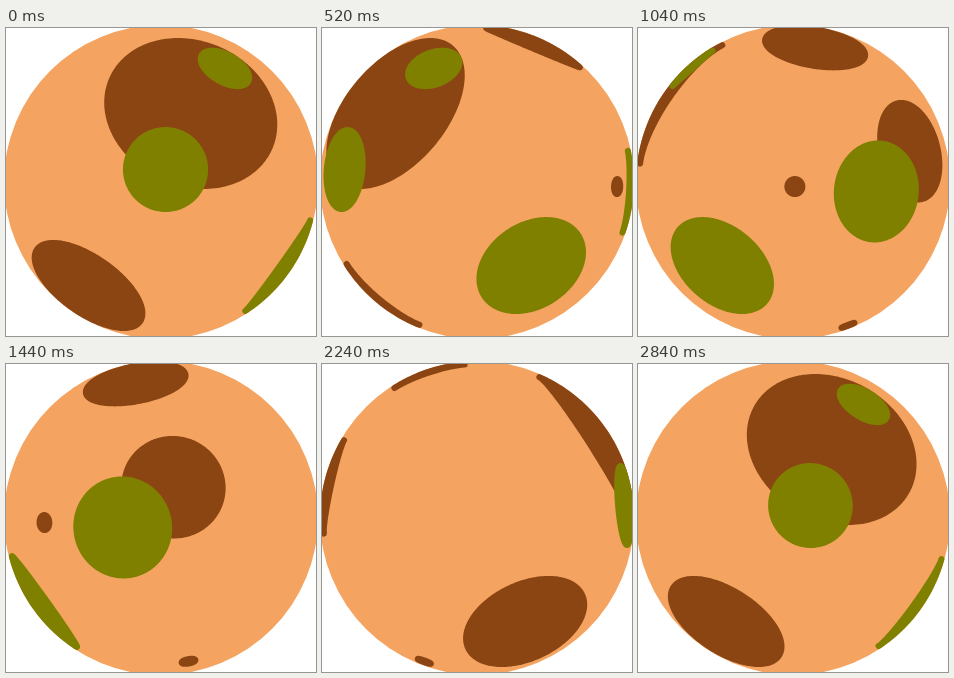
An HTML page with a canvas that plays this animation: 310 by 308 pixels, repeating every 2.88 s.

```html
<!DOCTYPE html>
<html lang="en">
<head>
<meta charset="utf-8">
<title>Spotted globe</title>
<style>
  html, body { margin: 0; width: 100%; height: 100%; overflow: hidden; background: #fff; }
  canvas { display: block; }
</style>
</head>
<body>
<canvas id="globe" width="310" height="308"></canvas>
<script>
const ctx = document.getElementById('globe').getContext('2d');
const CX = 155, CY = 154, RADIUS = 154, BRUSH = 3;
const LOOP = 2880, STEP = 40;
const RAD = Math.PI / 180, TAU = 2 * Math.PI;
const BROWN = '#8b4513', OLIVE = '#808000', SAND = '#f4a460';

// colour, latitude (down is positive), starting longitude, angular radius; degrees
const spots = [
  [BROWN, -32.4, 16, 33.9],
  [BROWN, 1.7, 130.7, 2.8],
  [BROWN, 47.4, -49.6, 24.1],
  [BROWN, -67.3, 153.2, 19.2],
  [BROWN, -12.2, 185, 18.7],
  [BROWN, 68.7, 209.5, 2.6],
  [OLIVE, -4.8, 1.75, 14.9],
  [OLIVE, -48.5, 39.5, 10],
  [OLIVE, 35.6, 92.7, 21.3],
  [OLIVE, 3.7, 164.8, 18.2]
];

function drawSpot([color, latDeg, lonDeg, sizeDeg], turn) {
  const lat = latDeg * RAD, lon = lonDeg * RAD - turn, size = sizeDeg * RAD;
  const sinLat = Math.sin(lat), cosLat = Math.cos(lat);
  const sinLon = Math.sin(lon), cosLon = Math.cos(lon);
  const sinSize = Math.sin(size), cosSize = Math.cos(size);
  const centre = [cosLat * sinLon, sinLat, cosLat * cosLon];
  if (centre[2] <= -sinSize) return;

  const east = [cosLon, 0, -sinLon];
  const south = [-sinLat * sinLon, cosLat, -sinLat * cosLon];
  const azimuth = Math.atan2(centre[1], centre[0]);
  const reach = Math.acos(Math.min(1, cosSize / Math.hypot(centre[0], centre[1])));

  ctx.beginPath();
  for (let i = 0; i < 180; i++) {
    const a = i / 180 * TAU;
    let [x, y, z] = centre.map((c, k) =>
      cosSize * c + sinSize * (Math.cos(a) * east[k] + Math.sin(a) * south[k]));
    if (z < 0) {
      // hidden outline follows the limb between its two crossings
      const raw = Math.atan2(y, x) - azimuth;
      const offset = Math.atan2(Math.sin(raw), Math.cos(raw));
      const limb = azimuth + Math.max(-reach, Math.min(reach, offset));
      x = Math.cos(limb);
      y = Math.sin(limb);
    }
    ctx.lineTo(CX + RADIUS * x, CY + RADIUS * y);
  }
  ctx.closePath();
  ctx.fillStyle = ctx.strokeStyle = color;
  ctx.fill();
  ctx.stroke();
}

function draw(now) {
  const turn = Math.floor(now % LOOP / STEP) * STEP / LOOP * TAU;
  ctx.fillStyle = '#fff';
  ctx.fillRect(0, 0, 310, 308);
  ctx.fillStyle = SAND;
  ctx.beginPath();
  ctx.arc(CX, CY, RADIUS + BRUSH, 0, TAU);
  ctx.fill();
  ctx.lineWidth = 2 * BRUSH;
  ctx.lineJoin = 'round';
  for (const spot of spots) drawSpot(spot, turn);
}

const start = performance.now();
function tick() {
  draw(performance.now() - start);
  requestAnimationFrame(tick);
}
tick();
</script>
</body>
</html>
```
